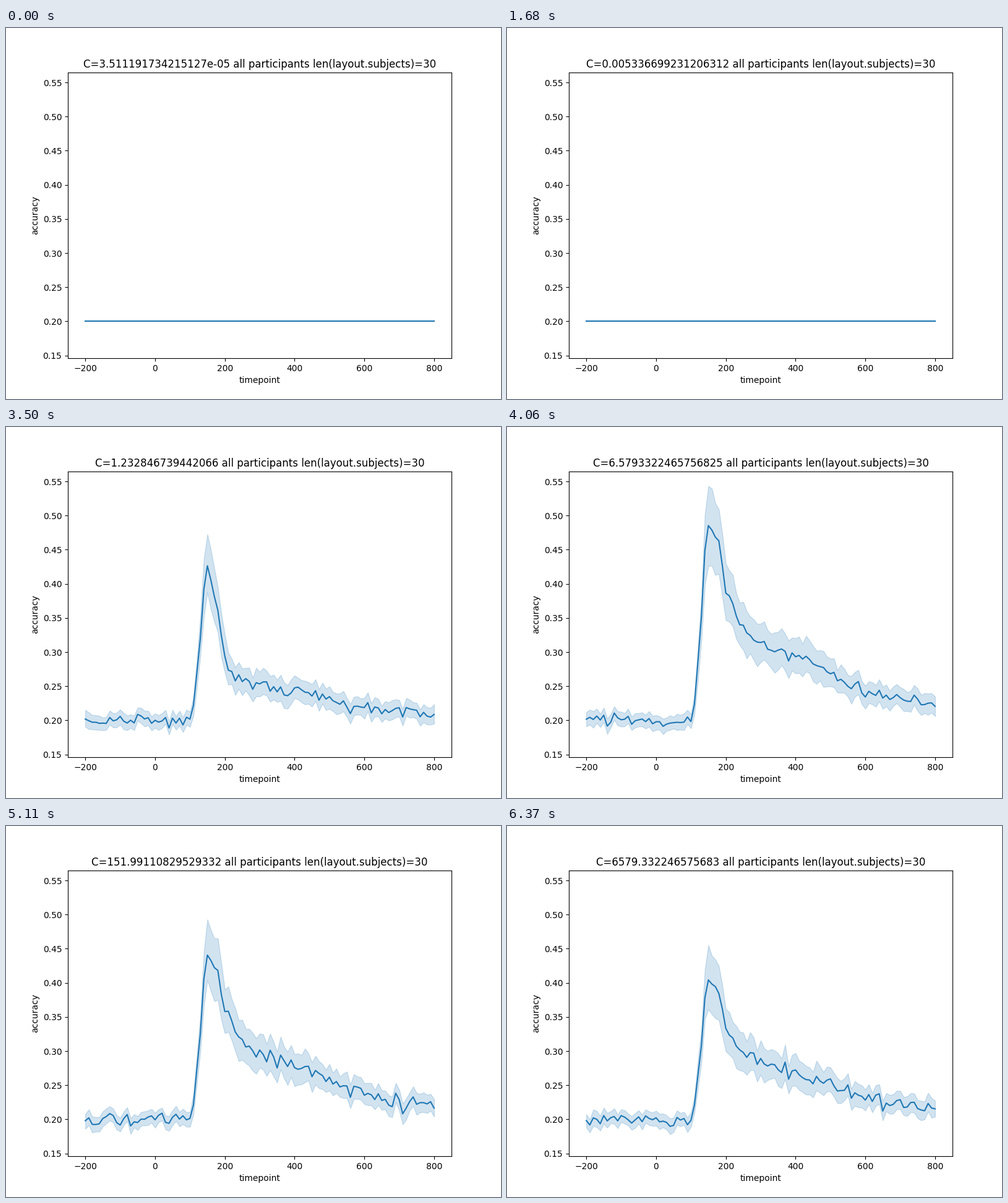
A matplotlib script for the animation above (6.44 s loop, 800 by 600 pixels).

```python
import numpy as np
import matplotlib.pyplot as plt
from matplotlib.animation import FuncAnimation

FRAMES, INTERVAL = 92, 70
CHANCE = 0.2
SUBJECTS = 30
STIR, ONSET, FORMED = 30, 42, 50   # first ripples, start of growth, full response
HOLD = 4                           # frames between two jitter anchors

strengths = [10.0 ** float(e) for e in np.linspace(-5, 4, 100)[6:98]]
t = np.arange(-200, 801, 10)
rng = np.random.default_rng(11)

# Response above chance, relative to its peak
response = np.interp(t, [100, 110, 120, 130, 140, 150, 180, 200, 240, 290, 430, 540, 700, 800],
                     [0, 0.09, 0.31, 0.53, 0.86, 1, 0.91, 0.66, 0.51, 0.40, 0.32, 0.19, 0.10, 0.08])
past_peak = np.clip((t - 150) / 60, 0, 1)

# Jitter: a lasting part after onset and a part that drifts from frame to frame
steep = (t >= 100) & (t <= 200)
lasting = np.where(t > 200, 0.0035, 0) * np.clip(rng.normal(size=t.size), -2, 2)
drift_size = np.where(steep, 0.002, 0.0045)
anchors = np.clip(rng.normal(size=(3, FRAMES // HOLD + 2, t.size)), -2, 2)

# Cubed noise gives a few isolated bumps on a flat line
ripple = np.where(t > 30, np.clip(0.0004 * rng.normal(size=t.size) ** 3, -0.0025, 0.003), 0)


def ramp(i, start, end):
    return min(max((i - start) / (end - start), 0), 1)


def drift(layer, i):
    a, step = divmod(i, HOLD)
    f = step / HOLD
    mix = anchors[layer, a] * (1 - f) + anchors[layer, a + 1] * f
    return mix / np.hypot(f, 1 - f)


def state(i):
    """Mean, lower and upper curve for one frame."""
    early = ramp(i, STIR, ONSET) ** 2
    grow = ramp(i, ONSET, FORMED) ** 1.5
    peak = np.interp(i, [FORMED, 57, 66, 79, 91], [0.226, 0.29, 0.255, 0.223, 0.205])
    tail = 0.55 + 0.45 * ramp(i, FORMED, 57)

    excess = peak * response * (1 - (1 - tail) * past_peak)
    noise = lasting + drift_size * drift(0, i)
    half = 0.0105 + 0.155 * excess
    still = ripple * early * (1 - grow)

    mean = CHANCE + still + (excess + noise) * grow
    down, up = (1.2 * np.abs(still) + half * (1 + 0.1 * drift(k, i)) * grow for k in (1, 2))
    return mean, mean - down, mean + up


fig, ax = plt.subplots(figsize=(8, 6), dpi=100)
flat = np.full(t.size, CHANCE)
line, = ax.plot(t, flat, color="C0")
band = ax.fill_between(t, flat, flat, color="C0", alpha=0.2)
ax.set(xlim=(-250, 850), ylim=(0.1461, 0.5645), xlabel="timepoint", ylabel="accuracy")
title = ax.set_title("")


def draw(i):
    mean, low, high = state(i)
    line.set_ydata(mean)
    band.set_verts([np.column_stack([np.r_[t, t[::-1]], np.r_[low, high[::-1]]])])
    title.set_text(f"C={strengths[i]} all participants len(layout.subjects)={SUBJECTS}")
    return line, band, title


anim = FuncAnimation(fig, draw, frames=FRAMES, interval=INTERVAL, repeat=True,
                     repeat_delay=0, blit=False)
plt.show()
```
